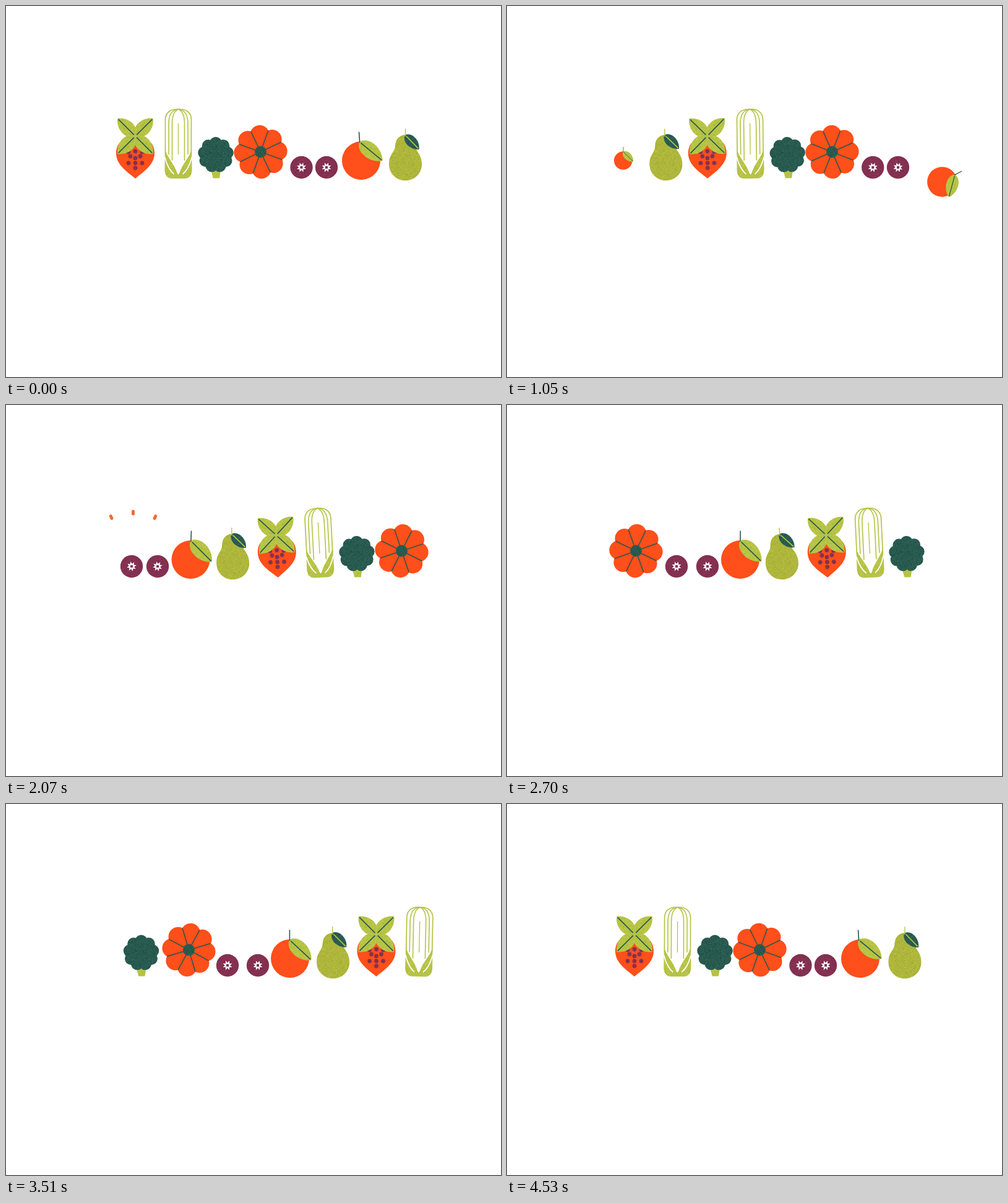
Write an HTML page with a canvas that moves like this. It is 800 px wide and 600 px high and loops after 4560 ms.

```html
<!DOCTYPE html>
<html lang="en">
<head>
<meta charset="utf-8">
<title>Fruit and vegetable parade</title>
<style>
html, body { margin: 0; width: 100%; height: 100%; overflow: hidden; background: #fff; }
canvas { display: block; }
</style>
</head>
<body>
<canvas id="stage" width="800" height="600"></canvas>
<script>
const ctx = document.getElementById('stage').getContext('2d');
const LOOP = 4560, RING = 506, ENTER = 186, EDGE = 672, GONE = 708;
const TIMES = [0, 660, 1410, 2070, 2700, 3510, 4530, LOOP];
const clamp = v => Math.max(0, Math.min(1, v));
const rad = deg => deg * Math.PI / 180;

let seed = 7;
const random = () => (seed = seed * 16807 % 2147483647) / 2147483647;

// Printed-ink grain as a repeating fill.
function grain(r, g, b, amount) {
  const tile = document.createElement('canvas');
  tile.width = tile.height = 128;
  const pen = tile.getContext('2d');
  const image = pen.createImageData(128, 128);
  for (let i = 0; i < image.data.length; i += 4) {
    const d = (random() + random() - 1) * amount;
    image.data.set([r + d, g + d, b + d, 255], i);
  }
  pen.putImageData(image, 0, 0);
  return ctx.createPattern(tile, 'repeat');
}

const LIME = grain(182, 195, 69, 16);
const PEAR = grain(174, 183, 59, 18);
const DARK = grain(40, 90, 79, 18);
const PLUM = grain(132, 48, 80, 12);
const ORANGE = '#ff4f1a', LINE = '#28594e', GREEN = '#b6c345';

function fill(path, color) {
  ctx.fillStyle = color;
  ctx.fill(new Path2D(path));
}
function stroke(path, color, width) {
  ctx.strokeStyle = color;
  ctx.lineWidth = width;
  ctx.stroke(new Path2D(path));
}
function disc(x, y, r, color) {
  ctx.fillStyle = color;
  ctx.beginPath();
  ctx.arc(x, y, r, 0, 7);
  ctx.fill();
}
function at(x, y, deg, draw) {
  ctx.save();
  ctx.translate(x, y);
  ctx.rotate(rad(deg));
  draw();
  ctx.restore();
}
function bothSides(draw) {
  for (const side of [1, -1]) {
    ctx.save();
    ctx.scale(side, 1);
    draw();
    ctx.restore();
  }
}
function leaf(x, y, deg, length, width, color, rib) {
  at(x, y, deg, () => {
    const w = width * 1.33, a = length * 0.12, b = length * 0.72;
    fill(`M0 0C${a} ${-w} ${b} ${-w} ${length} 0C${b} ${w} ${a} ${w} 0 0Z`, color);
    stroke(`M3 0H${length - 2}`, rib, 1.7);
  });
}

// Each drawing has x = 0 at its middle and y on the stage.
function strawberry() {
  fill('M-31 238C-31 257-13 268 0 279C13 268 31 257 31 238C31 230 28 223 24 220H-24C-28 223-31 230-31 238Z', ORANGE);
  disc(0, 235, 3.4, PLUM);
  for (const y of [246, 254, 262]) disc(0, y, 3.4, PLUM);
  bothSides(() => {
    disc(8, 243, 3.4, PLUM);
    disc(11, 254, 3.4, PLUM);
    disc(11, 236, 3.4, PLUM);
  });
  for (let i = 0; i < 4; i++) leaf(0, 210.5, 45 + 90 * i, 40.5, 11.5, LIME, LINE);
}

function corn() {
  stroke('M-21 240V184C-21 172-12 167-3 167H3C12 167 21 172 21 184V240', GREEN, 1.7);
  stroke('M0 190V240', GREEN, 1.3);
  bothSides(() => {
    stroke('M0 167C7 170 10 178 10 190V250', GREEN, 1.6);
    stroke('M0 167C10 168 15.5 176 15.5 190V240', GREEN, 1.6);
    fill('M21.5 231C18 246 7 254 1.5 271L-.3 273V279H10Q22 279 22 264Z', LIME);
    stroke('M22 244C18 260 13 267 7 272', '#fff', 1.8);
  });
}

function broccoli() {
  fill('M-7.5 265H8L6 278.5H-4.5Z', LIME);
  disc(0, 240.5, 23, DARK);
  for (let i = 0; i < 9; i++) {
    const a = rad(i * 40 - 90);
    disc(18.8 * Math.cos(a), 240.7 + 18.8 * Math.sin(a), 10.2, DARK);
  }
}

function pumpkin() {
  at(0, 236, 0, () => {
    disc(0, 0, 32, ORANGE);
    for (let i = 0; i < 8; i++) {
      const a = rad(i * 45);
      disc(27.6 * Math.cos(a), 27.6 * Math.sin(a), 15.6, ORANGE);
    }
    for (let i = 0; i < 8; i++) at(0, 0, 22.5 + i * 45, () => stroke('M8 0H36.5', LINE, 1.6));
    disc(0, 0, 9.5, DARK);
  });
}

function berry() {
  disc(0, 261, 18.2, PLUM);
  at(0, 261, 0, () => {
    ctx.fillStyle = '#fff';
    ctx.beginPath();
    for (let i = 0; i < 16; i++) {
      const a = rad(i * 22.5 + 22.5), r = i % 2 ? 4.3 : 8;
      ctx.lineTo(r * Math.cos(a), r * Math.sin(a));
    }
    ctx.fill();
    fill('M-2-2H2V2H-2Z', PLUM);
  });
}

function orange() {
  disc(0, 250, 31, ORANGE);
  leaf(-1, 219.5, 43, 48.5, 12.5, LIME, LINE);
  stroke('M-.6 221V203.5', LINE, 1.6);
}

function pear() {
  fill('M0 208.5C10 208.5 16 216 16.5 226C17 237 26.5 239 26.5 256C26.5 271 14.5 282.3 0 282.3C-14.5 282.3-26.5 271-26.5 256C-26.5 239-17 237-16.5 226C-16 216-10 208.5 0 208.5Z', PEAR);
  leaf(-0.5, 208.5, 46, 32.5, 8.6, DARK, GREEN);
  stroke('M0 211V198.5', GREEN, 1.4);
}

// x: unwrapped travel, tilt: sway in degrees, both keyed at TIMES.
const items = [
  { draw: strawberry, mid: 230, x: [209, 284.5, 360, 437.5, 516.5, 598.5, 712], tilt: [0, 3, -4, -2.5, -2, 0, 0] },
  { draw: corn, mid: 222, x: [278.5, 354, 429, 506, 585.5, 668, 781.5], tilt: [0, -3.8, 2, -3, -2.8, 1.2, 0.2] },
  { draw: broccoli, mid: 240, x: [339, 414.5, 489, 567, 646, 724.5, 842], tilt: [0, -1, -2, -1, -1, 0, 0] },
  { draw: pumpkin, mid: 236, x: [411.5, 487, 561, 639.5, 714.5, 801.5, 914.5], tilt: [-3, -2.5, 0, 4, 3, 6, -3] },
  { draw: berry, mid: 261, x: [477.5, 552.5, 627, 709, 780, 864, 980.5], tilt: [0, 2, 4, 10, 0, 0, 0] },
  { draw: berry, mid: 261, x: [518, 593, 668, 751, 830, 913, 1021], tilt: [0, 2, 4, 10, 0, 0, 0] },
  { draw: orange, mid: 250, x: [574, 650, 734, 804.5, 883, 965, 1077], tilt: [-3.5, 0, 3.5, 2, 1, 0, -3.5] },
  { draw: pear, mid: 250, x: [645.5, 720, 802, 872.5, 950, 1034.5, 1149], tilt: [0, -2.5, -2, -2, -4.5, -1, 0] }
];
for (const item of items) {
  item.x.push(item.x[0] + RING);
  item.tilt.push(item.tilt[0]);
}

function keyed(values, t, smooth) {
  let i = 0;
  while (t >= TIMES[i + 1]) i++;
  let u = (t - TIMES[i]) / (TIMES[i + 1] - TIMES[i]);
  if (smooth) u = u * u * (3 - 2 * u);
  return values[i] + (values[i + 1] - values[i]) * u;
}

function sparks(u) {
  for (const deg of [-24, 0, 24]) {
    at(205.5, 261, deg, () => {
      const r = 66 + 24 * (1 - (1 - u) ** 2);
      ctx.lineCap = 'round';
      stroke(`M0 ${-r + 4.5}V${-r + 0.5}`, '#f36b2f', 5);
      ctx.lineCap = 'butt';
    });
  }
}

function place(item, x, tilt) {
  if (x < ENTER || x > GONE) return;
  const pop = clamp((x - ENTER) / 14) - 1;
  const fall = clamp((x - EDGE) / (GONE - EDGE));
  const scale = (1 + 2.7 * pop ** 3 + 1.7 * pop ** 2) * (1 - fall ** 3);
  const burst = (x - 191) / 14;
  if (burst > 0 && burst < 1) sparks(burst);
  if (scale <= 0) return;
  ctx.save();
  ctx.translate(fall ? EDGE + 52 * fall : x, item.mid + (345 - item.mid) * fall * fall);
  ctx.rotate(rad(tilt + 100 * fall));
  ctx.scale(scale, scale);
  ctx.translate(0, -item.mid);
  item.draw();
  ctx.restore();
}

function frame(now) {
  const t = Math.floor((now % LOOP) / 30) * 30;
  ctx.fillStyle = '#fff';
  ctx.fillRect(0, 0, 800, 600);
  for (const item of items) {
    const x = keyed(item.x, t), tilt = keyed(item.tilt, t, true);
    for (let lap = 0; lap < 3; lap++) place(item, x - lap * RING, tilt);
  }
}

const start = performance.now();
function tick() {
  frame(performance.now() - start);
  requestAnimationFrame(tick);
}
tick();
</script>
</body>
</html>
```
